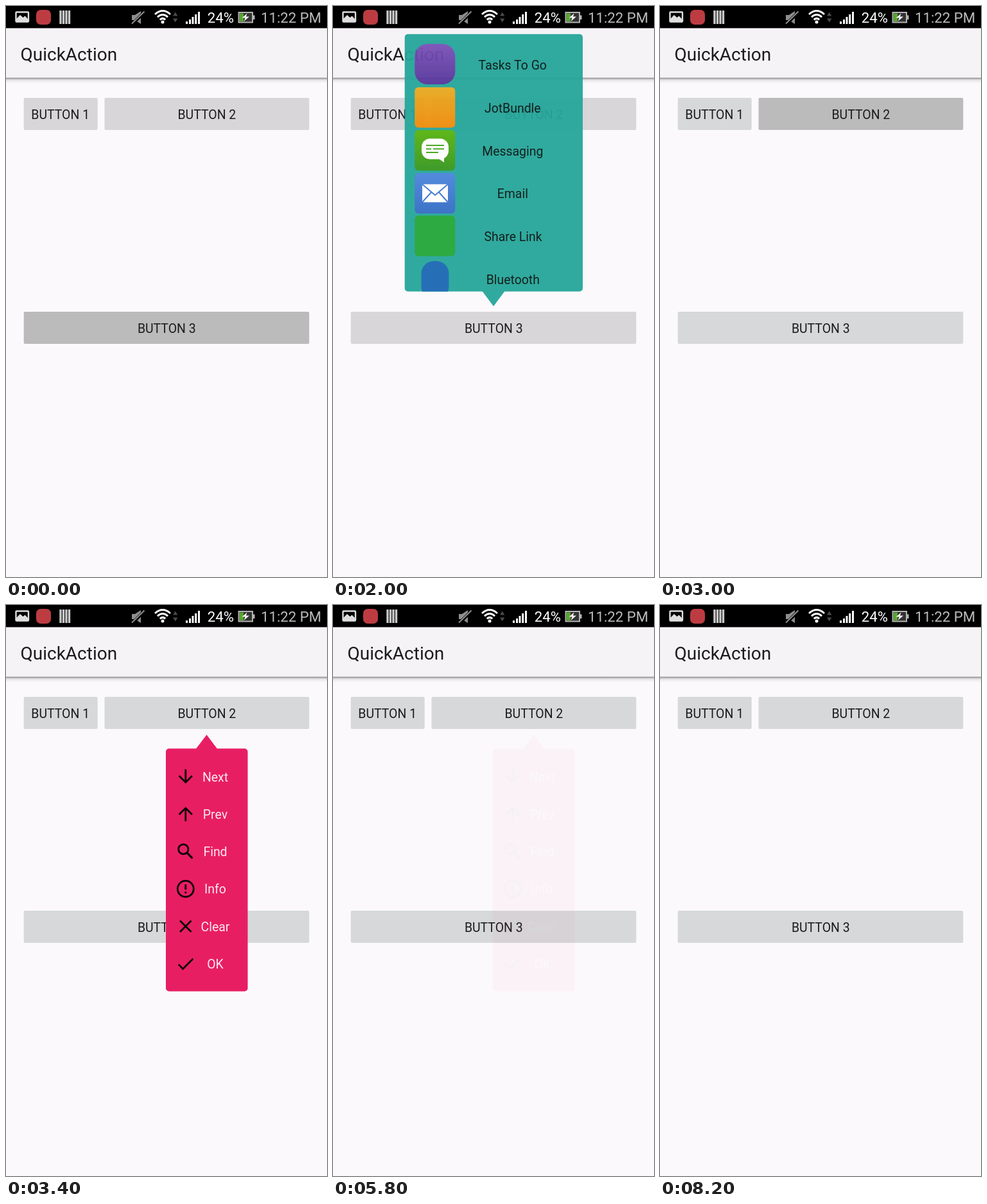
Write an HTML page that moves like this. It is 500 px wide and 889 px high and loops after 8400 ms.

```html
<!DOCTYPE html>
<html lang="en">
<head>
<meta charset="utf-8">
<title>QuickAction</title>
<style>
  html, body { margin: 0; width: 100%; height: 100%; overflow: hidden; background: #fbf9fc; }
  svg { display: block; width: 100%; height: 100%; }
  text { font: 19.44px Roboto, sans-serif; fill: #1b1b1d; }
  .mid text { text-anchor: middle; }
  .status { font-size: 22.2px; }
  .title { font-size: 28px; }
  .line { fill: none; stroke: #0c0408; stroke-width: 2; }
  .btn { fill: #d6d8d9; }
  .share text { fill: #071513; }
  .menu text { fill: #fdeaf1; }
  .toast text { font-size: 20.5px; letter-spacing: -.8px; fill: #fff; text-shadow: 1px 1px 2px #333; }

  /* 8.4 s loop, held poses */
  .btn, .share, .menu, .toast { animation: 8.4s step-end infinite; }
  .warm { animation-name: warm; }
  .two { animation-name: two; }
  .three { animation-name: three; }
  .share { animation-name: share; transform-origin: 250px 467px; }
  .menu { animation-name: menu; transform-origin: 312.5px 202px; }
  .toast { animation-name: toast; }

  @keyframes warm {
    0% { fill: #d8d6d8; }
    26.19%, 100% { fill: #d6d8d9; }
  }
  @keyframes two {
    0% { fill: #d8d6d8; }
    26.19% { fill: #d6d8d9; }
    33.333% { fill: #bbb; }
    38.095%, 100% { fill: #d6d8d9; }
  }
  @keyframes three {
    0% { fill: #bbb; }
    2.38% { fill: #d8d6d8; }
    26.19%, 100% { fill: #d6d8d9; }
  }
  @keyframes share {
    0% { opacity: 0; transform: scale(.82); }
    2.38% { opacity: .8; transform: scale(.82); }
    4.761% { opacity: 1; transform: none; }
    23.809% { opacity: .95; transform: none; }
    26.19% { opacity: .4; transform: none; }
    28.571%, 100% { opacity: 0; transform: none; }
  }
  @keyframes menu {
    0% { opacity: 0; transform: scale(.82); }
    38.095% { opacity: .8; transform: scale(.82); }
    40.476% { opacity: 1; transform: none; }
    69.047% { opacity: .03; transform: none; }
    71.428%, 100% { opacity: 0; transform: none; }
  }
  @keyframes toast {
    0% { opacity: 0; }
    71.428% { opacity: .5; }
    73.809% { opacity: 1; }
    92.857% { opacity: .98; }
    95.238% { opacity: .5; }
    97.619%, 100% { opacity: 0; }
  }
</style>
</head>
<body>
<svg viewBox="0 0 500 889" preserveAspectRatio="none">
  <defs>
    <linearGradient id="shadow" x2="0" y2="1">
      <stop stop-color="#b4b2b5"/>
      <stop offset=".12" stop-color="#9c9b9d"/>
      <stop offset=".3" stop-color="#d0ced1"/>
      <stop offset=".5" stop-color="#ebe9ec"/>
      <stop offset="1" stop-color="#fbf9fc"/>
    </linearGradient>
    <linearGradient id="violet" x2="0" y2="1">
      <stop stop-color="#7a52b8"/><stop offset="1" stop-color="#55359a"/>
    </linearGradient>
    <linearGradient id="amber" x2="0" y2="1">
      <stop stop-color="#e8aa20"/><stop offset="1" stop-color="#f18c0c"/>
    </linearGradient>
    <linearGradient id="leaf" x2="0" y2="1">
      <stop stop-color="#58b40e"/><stop offset="1" stop-color="#35961f"/>
    </linearGradient>
    <linearGradient id="sky" x2="0" y2="1">
      <stop stop-color="#4a86dc"/><stop offset="1" stop-color="#346cc4"/>
    </linearGradient>
    <clipPath id="card"><rect x="111.700" y="43.700" width="277.300" height="400.800" rx="5"/></clipPath>
  </defs>

  <rect width="500" height="889" fill="#fbf9fc"/>
  <rect y="34" width="500" height="79" fill="#f5f3f6"/>
  <rect y="111.500" width="500" height="9" fill="url(#shadow)"/>
  <text class="title" x="22.500" y="85">QuickAction</text>

  <!-- status bar -->
  <rect width="500" height="34.500" fill="#000"/>
  <rect x="15.500" y="9.500" width="19.500" height="15" rx="1" fill="none" stroke="#dedede" stroke-width="2.400"/>
  <path d="M16 24v-4l6-6 4.500 4 3-2.500 5 5V24z" fill="#dedede"/>
  <rect x="47" y="6" width="23" height="23" rx="7" fill="#bd3c42"/>
  <path d="M85 7v21M89.500 7v21M94 7v21M98.500 7v21" stroke="#c8c8c8" stroke-width="3.400"/>
  <path d="M196 14h5l9-6v20l-9-6h-5z" fill="#8e8e8e"/>
  <path d="M197 28L216 9" stroke="#000" stroke-width="5"/>
  <path d="M196 27.500L215.500 8.500" stroke="#8e8e8e" stroke-width="2"/>
  <g fill="none" stroke="#fff" stroke-width="2.900">
    <path d="M232 13q12-11 24 0"/>
    <path d="M236 17.300q8-7.500 16 0"/>
    <path d="M239.800 21.400q4.200-4 8.400 0"/>
  </g>
  <circle cx="244" cy="25" r="2.500" fill="#fff"/>
  <path d="M260 15.500l3.700-6 3.700 6zM260 19.500l3.700 6 3.700-6z" fill="#4a4a4a"/>
  <path d="M281.500 28v-4M286.500 28v-7M291 28v-11M295.700 28v-15M300.500 28v-19" stroke="#fff" stroke-width="3"/>
  <text class="status" x="313.700" y="25.500" style="fill:#fff">24%</text>
  <rect x="362.500" y="10" width="21.500" height="15.500" fill="#333" stroke="#b4b4b4" stroke-width="2"/>
  <rect x="364" y="11.500" width="6" height="12.500" fill="#55a82c"/>
  <rect x="385" y="14.500" width="2.500" height="6.500" fill="#b4b4b4"/>
  <path d="M375.500 11.500l-8 7h5l-2 5.500 8.500-7.500h-5z" fill="#f2f2f2"/>
  <text class="status" x="397" y="25.500" style="fill:#bcbcbc">11:22 PM</text>

  <!-- buttons -->
  <rect class="btn warm" x="27.700" y="143" width="115" height="50" rx="2"/>
  <rect class="btn two" x="153.500" y="143" width="318.800" height="50" rx="2"/>
  <rect class="btn three" x="27.700" y="476" width="444.600" height="50" rx="2"/>
  <g class="mid">
    <text x="84.700" y="176">BUTTON 1</text>
    <text x="312.900" y="176">BUTTON 2</text>
    <text x="250.300" y="509">BUTTON 3</text>
  </g>

  <!-- share popup -->
  <g class="share mid">
    <path d="M232.500 444h35L250 467.500z" fill="#26a69a"/>
    <g clip-path="url(#card)">
      <rect x="111" y="43" width="279" height="402" fill="#26a69a"/>
      <rect x="127.300" y="59" width="63" height="63" rx="20" fill="url(#violet)"/>
      <rect x="127.300" y="126.500" width="63" height="63" rx="6" fill="url(#amber)"/>
      <rect x="127.300" y="193.300" width="63" height="63" rx="6" fill="url(#leaf)"/>
      <rect x="138" y="206.500" width="42" height="32" rx="13" fill="#fff"/>
      <path d="M162 236l11 7.500v-10z" fill="#fff"/>
      <path d="M145 217h28M145 222.500h8m3 0h17M145 228h19" stroke="#45a518" stroke-width="2.200"/>
      <rect x="127.300" y="260" width="63" height="63" rx="6" fill="url(#sky)"/>
      <rect x="139" y="277.500" width="40" height="28" fill="#fff"/>
      <path d="M139 277.500l20 17 20-17M139 305.500l14-15.500M179 305.500l-14-15.500" fill="none" stroke="#3f78cf" stroke-width="2"/>
      <rect x="127.300" y="326.500" width="63" height="63" rx="6" fill="#22a637"/>
      <rect x="137.500" y="397" width="43" height="60" rx="20" fill="#1b68b4"/>
    </g>
    <text x="279.800" y="99">Tasks To Go</text>
    <text x="279.800" y="166">JotBundle</text>
    <text x="279.800" y="232.500">Messaging</text>
    <text x="279.800" y="299">Email</text>
    <text x="280.500" y="366">Share Link</text>
    <text x="280.300" y="432.500">Bluetooth</text>
  </g>

  <!-- action popup -->
  <g class="menu mid">
    <path d="M295.500 224.500h34L312.500 202z" fill="#e81e63"/>
    <rect x="249" y="223.500" width="127.500" height="378" rx="5" fill="#e81e63"/>
    <g class="line" transform="translate(263.100 250.300) scale(1.389)">
      <path d="M12 4v15M4.700 11.300L12 18.600l7.300-7.300"/>
      <path d="M12 62V47M4.700 54.700L12 47.400l7.300 7.300"/>
      <g transform="translate(0 84)">
        <circle cx="9.500" cy="9.500" r="5.500"/>
        <path d="M13.600 13.600l6.100 6.100" stroke-width="2.300"/>
      </g>
      <g transform="translate(0 126)">
        <circle cx="12" cy="12" r="9"/>
        <path d="M12 7v6M12 15v2"/>
      </g>
      <path d="M5.700 173.700l12.600 12.600M18.300 173.700L5.700 186.300"/>
      <path d="M4.100 222.700L9 227.600l11.300-11.300"/>
    </g>
    <text x="326" y="274.500">Next</text>
    <text x="326" y="332.800">Prev</text>
    <text x="326" y="391.100">Find</text>
    <text x="326" y="449.400">Info</text>
    <text x="326" y="507.700">Clear</text>
    <text x="326" y="566">OK</text>
  </g>

  <g class="toast mid">
    <rect x="162" y="739" width="176" height="61" rx="30" fill="#6b686b"/>
    <text x="249.700" y="777.800">Info selected</text>
  </g>
</svg>
</body>
</html>
```
